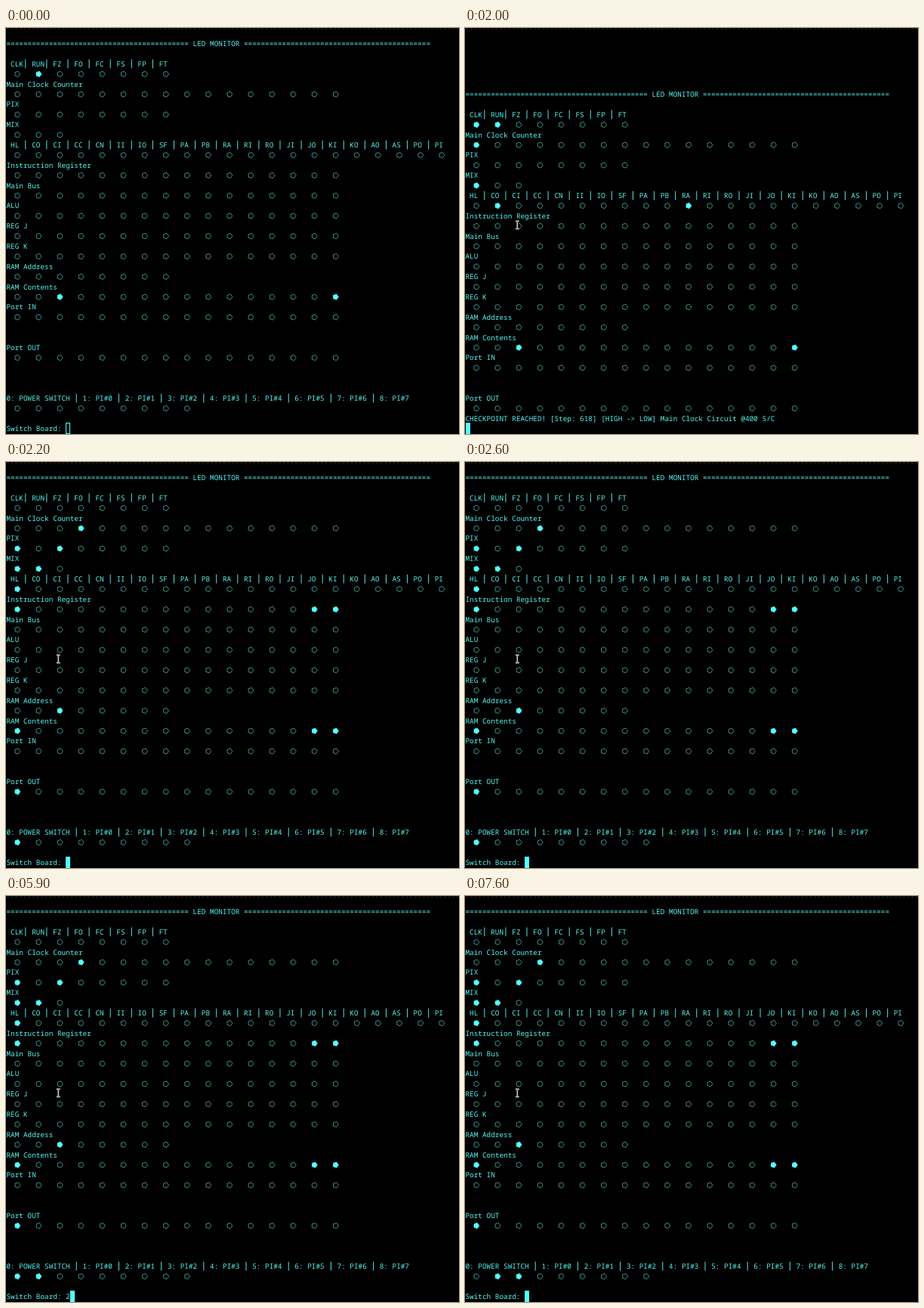
An HTML page for the animation above (8000 ms loop, 600 px wide and 537 px high).

```html
<!DOCTYPE html>
<html lang="en">
<head>
<meta charset="utf-8">
<title>LED Monitor</title>
<style>
  html, body { margin: 0; width: 100%; height: 100%; overflow: hidden; background: #000; }
  svg { display: block; width: 600px; height: 537px; overflow: hidden; }
  text {
    font: 500 9.367px "Noto Sans Mono", "DejaVu Sans Mono", monospace;
    fill: #55f4f0;
    text-rendering: geometricPrecision;
    font-variant-ligatures: none;
  }
  .bar { stroke: #55f4f0; stroke-width: .95; }
  .led { fill: none; stroke: #52bdb9; stroke-width: .75; }
  .led.on { fill: #55ffff; stroke: #55ffff; }
  .cursor { fill: #55ffff; stroke: #55ffff; }
  .cursor.hollow { fill: none; }
  .edge { stroke: #2a2a2a; stroke-width: 1; stroke-dasharray: 3.4 2.22; }
</style>
</head>
<body>
<svg id="stage" viewBox="0 0 600 537">
  <path class="edge" d="M1 1.2H600"/>
  <g id="panel"></g>
  <g id="prompt"></g>
  <rect id="cursor" class="cursor" y="522.5" width="5" height="14"/>
  <g id="pointer" fill="none">
    <path d="M-3 -5.5H3M-3 5.5H3M0 -5.5V5.5" stroke="#000" stroke-width="3.6"/>
    <path d="M-2.5 -5.2H2.5M-2.5 5.2H2.5M0 -5V5" stroke="#bbb" stroke-width="1.8"/>
  </g>
</svg>
<script>
const LOOP = 8000, LEFT = .5, COL = 5.62, ROW = 13.4;
const $ = id => document.getElementById(id);
const panel = $('panel'), prompt = $('prompt'), cursor = $('cursor'), pointer = $('pointer');
const rowY = row => 7.1 + row * ROW;
const colX = col => LEFT + col * COL;
const keepSpaces = line => line.replace(/[ |]/g, '\u00a0');

function add(parent, tag, attrs) {
  const el = document.createElementNS('http://www.w3.org/2000/svg', tag);
  for (const key in attrs) el.setAttribute(key, attrs[key]);
  return parent.appendChild(el);
}

// Writes a terminal line; pipes are full-height bars.
function write(parent, row, line) {
  const y = rowY(row);
  const el = add(parent, 'text', { x: LEFT, y: y + 3.4 });
  el.textContent = keepSpaces(line);
  [...line].forEach((ch, i) => {
    if (ch === '|') add(parent, 'path', { class: 'bar', d: `M${colX(i + .5)} ${y - 5.8}v11.8` });
  });
  return el;
}

// Right-pointing pentagon
const pentagon = [0, 1, 2, 3, 4].map(i => {
  const a = i * Math.PI * 2 / 5;
  return [3.8 * Math.cos(a), 3.8 * Math.sin(a)].map(v => v.toFixed(2));
}).join(' ');

const leds = {};
function ledRow(row, count) {
  leds[row] = Array.from({ length: count }, (_, i) => add(panel, 'polygon', {
    class: 'led', points: pentagon,
    transform: `translate(${15.1 + i * 5 * COL} ${rowY(row) + .2})`
  }));
}

const cells = names => names.split(' ').map(n => ' ' + n.padEnd(3)).join('|');
const sections = [
  [3, cells('CLK RUN FZ FO FC FS FP FT'), 8],
  [5, 'Main Clock Counter', 16],
  [7, 'PIX', 8],
  [9, 'MIX', 3],
  [11, cells('HL CO CI CC CN II IO SF PA PB RA RI RO JI JO KI KO AO AS PO PI'), 21],
  [13, 'Instruction Register', 16],
  [15, 'Main Bus', 16],
  [17, 'ALU', 16],
  [19, 'REG J', 16],
  [21, 'REG K', 16],
  [23, 'RAM Address', 8],
  [25, 'RAM Contents', 16],
  [27, 'Port IN', 16],
  [31, 'Port OUT', 16],
  [36, '0: POWER SWITCH' + [...'01234567'].map(n => ` | ${+n + 1}: PI#${n}`).join(''), 9]
];
write(panel, 1, '='.repeat(43) + ' LED MONITOR ' + '='.repeat(44));
for (const [row, label, count] of sections) {
  write(panel, row, label);
  ledRow(row + 1, count);
}
const message = write(prompt, 38, '');
const input = write(prompt, 39, '');

// Lit lamps by row
const idle = { 4: [1], 26: [2, 15] };
const fetching = { 4: [0, 1], 6: [0], 10: [0], 12: [1, 10], 26: [2, 15] };
const stepping = { ...fetching, 6: [2], 8: [0], 14: [2, 15] };
const halted = switches => ({
  6: [3], 8: [0, 2], 10: [0, 1], 12: [0], 14: [0, 14, 15],
  24: [2], 26: [0, 14, 15], 32: [0], 37: switches
});

const scenes = [
  { at: 0, lit: idle, typed: '' },
  { at: 1200, lit: idle, typed: '0' },
  { at: 2000, lit: fetching, step: 618 },
  { at: 2100, lit: stepping, step: 642 },
  { at: 2200, lit: halted([0]), typed: '' },
  { at: 4400, lit: halted([0]), typed: '1' },
  { at: 5100, lit: halted([0, 1]), typed: '' },
  { at: 5900, lit: halted([0, 1]), typed: '2' },
  { at: 6300, lit: halted([0, 1, 2]), typed: '' },
  { at: 7100, lit: halted([0, 1, 2]), typed: '0' },
  { at: 7600, lit: halted([1, 2]), typed: '' }
];

let shown;
function show(scene) {
  if (scene === shown) return;
  shown = scene;
  const { lit, step, typed } = scene;
  for (const row in leds)
    leds[row].forEach((led, i) => led.classList.toggle('on', !!lit[row] && lit[row].includes(i)));
  panel.setAttribute('transform', `translate(0 ${step ? 5 * ROW : 0})`);
  const line = step ? '' : 'Switch Board: ' + typed;
  message.textContent = step
    ? keepSpaces(`CHECKPOINT REACHED! [Step: ${step}] [HIGH -> LOW] Main Clock Circuit @400 S/C`)
    : '';
  input.textContent = keepSpaces(line);
  cursor.setAttribute('x', Math.round(colX(line.length)) + .5);
}

function draw(t) {
  show(scenes.findLast(s => s.at <= t));
  cursor.classList.toggle('hollow', t < 300);
  // The pointer is sampled ten times a second.
  const p = Math.min(1, (Math.floor(t / 100) - 3) / 3);
  const ease = 1 - (1 - p) ** 2;
  pointer.setAttribute('visibility', t < 300 ? 'hidden' : 'visible');
  pointer.setAttribute('transform', `translate(${16 + 53.3 * ease} ${248 + 12.5 * ease})`);
}

function tick() {
  draw(performance.now() % LOOP);
  requestAnimationFrame(tick);
}
tick();
</script>
</body>
</html>
```
